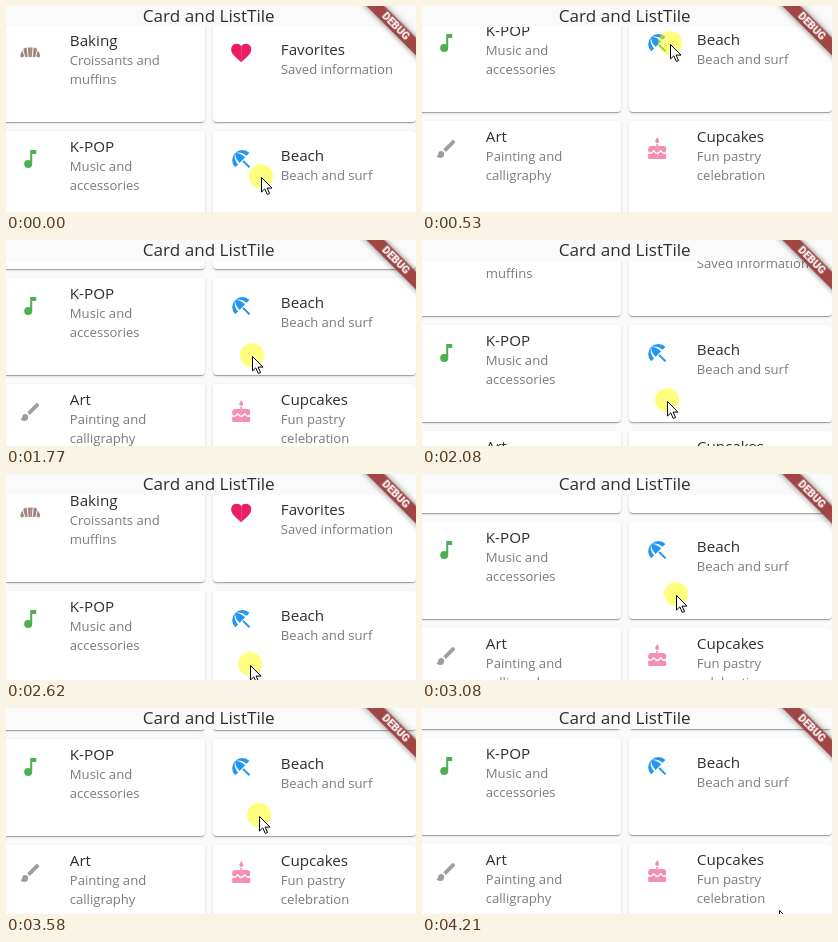
An HTML page for the animation above (4280 ms loop, 410 px wide and 206 px high).

```html
<!DOCTYPE html>
<html lang="en">
<head>
<meta charset="utf-8">
<title>Card and ListTile</title>
<style>
  html, body { margin: 0; width: 100%; height: 100%; overflow: hidden; background: #fafafa; }
  body { position: relative; font-family: "Open Sans", "Noto Sans", sans-serif; }
  #list { position: absolute; inset: 0; }
  .card {
    position: absolute; width: 203px; height: 97px; border-radius: 4px; background: #fff;
    box-shadow: 0 2px 1px -1px rgba(0,0,0,.2), 0 1px 1px rgba(0,0,0,.14), 0 1px 3px rgba(0,0,0,.12);
  }
  svg { position: absolute; left: 0; top: 0; width: 100%; height: 100%; overflow: hidden; }
  .name { font-size: 15.2px; fill: rgba(0,0,0,.82); }
  .note { font-size: 13.1px; fill: rgba(0,0,0,.52); }
  #bar {
    position: absolute; left: 0; top: 0; width: 100%; height: 21px; background: #fafafa;
    font-size: 17.1px; line-height: 20px; color: rgba(0,0,0,.82);
  }
  #bar span { position: absolute; left: 136.8px; white-space: nowrap; }
  #ribbon { filter: drop-shadow(0 0 3px rgba(0,0,0,.5)); }
  #ribbon text { font: 900 10.6px Roboto, sans-serif; fill: #fff; text-anchor: middle; }
</style>
</head>
<body>
<div id="list"></div>
<div id="bar"><span>Card and ListTile</span></div>
<svg>
  <g id="ribbon" transform="translate(410 0) rotate(45)">
    <rect x="-60" y="22.5" width="120" height="12.5" fill="#a24545"/>
    <text y="32.5">DEBUG</text>
  </g>
  <g id="pointer">
    <circle id="press" cx="-1" cy="-1" r="12" fill="#ff0" fill-opacity=".5"/>
    <path d="M-.5 .5V15l3.3-3.1 2.5 5.6 2.3-1-2.5-5.4H10z" fill="#fff" stroke="#000"/>
  </g>
</svg>
<script>
const PITCH = 106, LOOP = 4280, STEP = 77;
const path = d => `<path d="${d}"/>`;
const mirror = s => s + `<g transform="matrix(-1 0 0 1 24 0)">${s}</g>`;

const icons = {
  croissant: mirror(path("M12 6.5H9.6l.8 9.500H12zM5 8q1.500-1.400 3.500-1.600l1 9.600H7zM4.300 9.500l1.700 5.700-2.700 1.600Q1.300 15 2.500 12.500z")),
  heart: mirror(path("M12 21.300C5 15 2 12.500 2 8.500a5.500 5.500 0 0 1 10-3.400z")),
  note: `<circle cx="10" cy="17" r="4"/>` + path("M12 3h6v4h-4v10h-2z"),
  beach: path("M17.400 8.800l2.900-2.900A10 10 0 0 0 6 6q6-1.900 11.400 2.800z")
    + path("M6 6A10 10 0 0 0 6 20.300l2.900-2.900Q4 12 6 6z")
    + path("M6 6q-.6 4.500 4.300 10l5.700-5.700Q10.500 5.400 6 6z")
    + path("M13.100 14.600l1.400-1.400 6.500 6.400-1.400 1.400z"),
  brush: path("M7 14a3 3 0 0 0-3 3q0 2-2 2 1.500 2 4 2a4 4 0 0 0 4-4 3 3 0 0 0-3-3z")
    + path("M9 12.200L18 3.300q.7-.6 1.400 0l1.300 1.300q.6.7 0 1.400L11.700 15z"),
  cake: path("M12 0l1.700 3a2 2 0 1 1-3.400 0z")
    + mirror(path("M12 7h-1v2H6a3 3 0 0 0-3 3v1.500a2 2 0 0 0 3.400 1.400l2.100-2.100 2.100 2.100q.6.6 1.400.6z"))
    + mirror(path("M12 22H4a1 1 0 0 1-1-1v-4.600q2.300 1.300 4.300-.5l1.200-1.100 1.100 1.100q1 1 2.400 1z"))
};
const tiles = [
  ["croissant", "#a1887f", "Baking", "Croissants and", "muffins"],
  ["heart", "#e91e63", "Favorites", "Saved information"],
  ["note", "#4caf50", "K-POP", "Music and", "accessories"],
  ["beach", "#2196f3", "Beach", "Beach and surf"],
  ["brush", "#9e9e9e", "Art", "Painting and", "calligraphy"],
  ["cake", "#f48fb1", "Cupcakes", "Fun pastry", "celebration"]
];
const $ = id => document.getElementById(id);

$("list").innerHTML = tiles.map(([icon, color, name, ...notes], i) => {
  const x = i % 2 ? 207 : -4, y = ((i >> 1) - 1) * PITCH;
  const base = notes.length > 1 ? 21 : 30;
  const lines = notes.map((s, n) =>
    `<text class="note" x="67.8" y="${base + 19 * (n + 1)}">${s}</text>`).join("");
  return `<div class="card" style="left:${x}px;top:${y}px"><svg>
    <g transform="translate(16.200 16)" fill="${color}">${icons[icon]}</g>
    <text class="name" x="67.8" y="${base}">${name}</text>${lines}</svg></div>`;
}).join("");

// Each move runs in even steps: first step, last step, then the list offset and pointer it reaches
const moves = [
  { from: 0, to: 0, end: [125, 256, 171], down: true },
  { from: 70, to: 230, end: [98, 254, 144], down: true },
  { from: 380, to: 530, end: [9, 249, 38], down: true },
  { from: 610, to: 610, end: [9, 250, 14], down: true },
  { from: 690, to: 760, end: [9, 253, 36] },
  { from: 1240, to: 1390, end: [9, 254, 88] },
  { from: 1620, to: 1770, end: [38, 247, 116], down: true },
  { from: 1840, to: 2310, end: [120, 245, 194], down: true },
  { from: 2620, to: 2620, end: [117, 245, 191], down: true },
  { from: 2700, to: 3080, end: [48, 255, 121], down: true },
  { from: 3180, to: 3580, end: [31, 254, 108], down: true },
  { from: 3650, to: 3650, end: [30, 253, 107], down: true },
  { from: 3820, to: 4210, end: [30, 358, 202] }
];

function draw(t) {
  const i = moves.findLastIndex(m => m.from <= t);
  const { from, to, end, down } = moves[i];
  const start = moves[Math.max(0, i - 1)].end;
  const steps = Math.round((to - from) / STEP);
  const done = steps ? Math.min(steps, Math.floor((t - from) / (to - from) * steps + 0.05)) : 0;
  const p = (done + 1) / (steps + 1);
  const [offset, x, y] = end.map((v, n) => Math.round(start[n] + (v - start[n]) * p));
  $("list").style.transform = `translateY(${offset}px)`;
  $("pointer").setAttribute("transform", `translate(${x} ${y})`);
  $("press").style.display = down ? "" : "none";
}

const began = performance.now();
function tick() {
  draw((performance.now() - began) % LOOP);
  requestAnimationFrame(tick);
}
tick();
</script>
</body>
</html>
```
